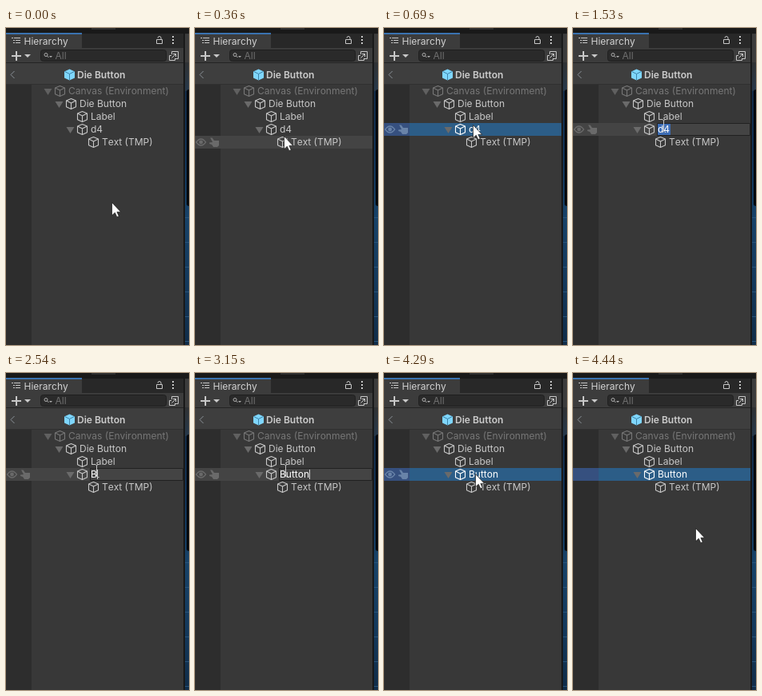
Recreate the animation shown at these times as an HTML page with a canvas. Size 229x397 px, loop 4470 ms.

```html
<!DOCTYPE html>
<html>
<head>
<meta charset="utf-8">
<title>Hierarchy rename</title>
<style>
html, body { margin: 0; width: 100%; height: 100%; overflow: hidden; background: #383838; }
canvas { display: block; }
</style>
</head>
<body>
<canvas id="stage" width="229" height="397"></canvas>
<script>
const g = document.getElementById('stage').getContext('2d', { alpha: false });
const LOOP = 4470, LIGHT = '#c8c8c8', RIGHT = 222, ROW = 16, TOP = 71;
const NAME_ROW = 3, TEXT_ROW = 4;

// Cursor keys: time, x, y
const keys = [
  [0, 132, 218], [360, 111, 135], [400, 111, 135], [520, 111, 121],
  [580, 111, 121], [620, 111, 117], [650, 111, 118], [690, 111, 121],
  [4260, 111, 121], [4440, 153, 194], [LOOP, 153, 194]
];
const typing = [[2540, 'B'], [2640, 'Bu'], [2810, 'But'], [2920, 'Butt'], [3040, 'Butto'], [3150, 'Button']];

function rect(x, y, w, h, color) {
  g.fillStyle = color;
  g.fillRect(x, y, w, h);
}

function text(s, x, y, color = LIGHT, weight = 400) {
  g.font = weight + ' 12px Inter, sans-serif';
  g.fontKerning = 'none';
  g.fillStyle = color;
  g.fillText(s, x, y);
}

function fill(d, color, x = 0, y = 0) {
  g.save();
  g.translate(x, y);
  g.fillStyle = color;
  g.fill(new Path2D(d));
  g.restore();
}

function line(d, color, x = 0, y = 0, width = 1) {
  g.save();
  g.translate(x, y);
  g.strokeStyle = color;
  g.lineWidth = width;
  g.lineJoin = 'round';
  g.stroke(new Path2D(d));
  g.restore();
}

function cube(x, y, color) {
  line('M0-6.5L6-4V3.7L0 6.5L-6 3.7V-4ZM-6-4L0-1L6-4M0-1V6.5', color, x, y, 1.1);
}

function gradient(x, y, w, h, ...colors) {
  const paint = g.createLinearGradient(0, y, 0, y + h);
  colors.forEach((c, i) => paint.addColorStop(i / (colors.length - 1), c));
  rect(x, y, w, h, paint);
}

function header() {
  rect(0, 0, 229, 7, '#191919');
  rect(107, 0, 30, 2, '#303030');
  rect(0, 7, RIGHT, 18, '#282828');
  rect(0, 7, 95, 18, '#3c3c3c');
  rect(0, 6, 95, 2, '#3a72b0');
  line('M10 12.5H18M12 15.5H18M12 18.5H18', LIGHT);
  fill('M7 12h2v1h-2zM9 15h2v1h-2zM9 18h2v1h-2z', LIGHT);
  text('Hierarchy', 22.5, 21, '#d2d2d2');

  line('M188.5 14.5H195.5V19.5H188.5ZM194 14.5V12.5A2 2 0 0 0 190 12.5', LIGHT);
  for (const y of [11, 15, 19]) rect(208, y - 1, 2, 2, LIGHT);

  rect(0, 25, RIGHT, 18, '#3c3c3c');
  rect(7, 34, 12, 2, LIGHT);
  rect(12, 29, 2, 12, LIGHT);
  fill('M23 33H31L27 37Z', LIGHT);
  g.beginPath();
  g.roundRect(43.5, 27.5, 157, 14, 3);
  g.fillStyle = '#2a2a2a';
  g.fill();
  g.strokeStyle = '#1f1f1f';
  g.lineWidth = 1;
  g.stroke();
  line('M52 33.5A2 2 0 1 1 48 33.5A2 2 0 1 1 52 33.5M51.5 35L53.5 37', '#b0b0b0');
  fill('M54 35H58L56 37Z', '#b0b0b0');
  text('All', 61.5, 39, '#707070');
  line('M207.5 33V29.5H215.5V38.5H212M207 34.5H204.5V40.5H211.5V38M207.5 37.5L212.5 32.5M209 32.5H212.5V36', LIGHT);

  rect(0, 43, RIGHT, 1, '#232323');
  rect(0, 44, RIGHT, 26, '#3e3e3e');
  rect(0, 70, RIGHT, 1, '#303030');
  line('M10.5 54L6 58.5L10.5 63', '#8b9299');
  fill('M0-7L6.5-4V4L0 7L-6.5 4V-4Z', '#7fd6fd', 79.5, 58.5);
  line('M-6-4L0-1L6-4M0-1V6.5', '#3c84a8', 79.5, 58.5);
  text('Die Button', 89, 63, '#cccccc', 600);
}

function rightEdge() {
  rect(222, 7, 2, 390, '#191919');
  rect(224, 8, 5, 35, '#3c3c3c');
  gradient(224, 43, 5, 36, '#303234', '#26384a');
  gradient(224, 79, 5, 318, '#142c48', '#123458', '#174268', '#14395c', '#102c48');
  for (let y = 237; y < 397; y += 31) rect(224, y, 5, 1, '#28537a');
  g.beginPath();
  g.roundRect(226, 77, 12, 146, 3);
  g.fillStyle = '#05080c';
  g.fill();
}

function hoverIcons(y, color) {
  line('M1.5 0Q7.5-8 13.5 0Q7.5 8 1.5 0Z', color, 0, y, 1.3);
  g.beginPath();
  g.arc(7.5, y, 2.4, 0, 7);
  g.fillStyle = color;
  g.fill();
  fill('M19-5.5H21.5L24-2H30V4L28 6H23L21 3L18 2V.5L22 0Z', color, 0, y);
}

function treeRow(i, x, label, color, open, iconColor = color) {
  const y = TOP + ROW * i + 8;
  if (open) fill('M-5-3H5L0 5Z', i ? '#6a6a6a' : '#606060', x - 14.5, y);
  cube(x + .5, y, iconColor);
  text(label, x + 11, y + 4, color);
}

function arrow(x, y) {
  const d = 'M.5.5V16.8L4.3 13.3L6.8 18.7L9.3 17.7L6.9 12.4H11.7Z';
  fill(d, '#ffffff', x, y);
  line(d, '#161616', x, y, .7);
}

function beam(x, y) {
  line('M-2.5.5H-1L.5 2L2 .5H3.5M.5 2V15M-2.5 16.5H-1L.5 15L2 16.5H3.5', '#c9c9c9', x, y);
}

function pointer(t) {
  t = Math.floor(t / 10) * 10;
  if (t < 360 || t >= 4260) t = Math.floor(t / 30) * 30;
  const i = Math.max(1, keys.findIndex(k => k[0] > t));
  const [t0, x0, y0] = keys[i - 1], [t1, x1, y1] = keys[i];
  const p = (t - t0) / (t1 - t0), e = p * p * (3 - 2 * p);
  return [Math.round(x0 + (x1 - x0) * e), Math.round(y0 + (y1 - y0) * e)];
}

function draw(t) {
  const [px, py] = pointer(t);
  const editing = t >= 1530 && t < 3380;
  const selected = t >= 650 && !editing;
  const typed = typing.filter(k => t >= k[0]).pop();
  const name = typed ? typed[1] : 'd4';
  const hover = Math.floor((py - TOP) / ROW);
  const y = TOP + ROW * NAME_ROW;

  rect(0, 0, 229, 397, '#383838');
  rect(0, TOP, 32, 326, '#2d2d2d');
  header();
  rightEdge();

  if (hover <= TEXT_ROW) rect(0, TOP + ROW * hover, RIGHT, ROW, '#444444');
  if (selected) {
    rect(0, y, RIGHT, ROW, '#2c5d87');
    rect(0, y, 32, ROW, '#36507f');
  }
  if (hover <= TEXT_ROW) {
    hoverIcons(TOP + ROW * hover + 8, selected && hover === NAME_ROW ? '#6983a8' : '#6a6a6a');
  }

  if (editing) {
    line(`M105.5 ${y + .5}H${RIGHT - .5}V${y + ROW - .5}H105.5Z`, '#212121');
    if (!typed) rect(106, y + 1, 16, ROW - 2, '#3d6db5');
  }

  treeRow(0, 67, 'Canvas (Environment)', '#777777', true);
  treeRow(1, 81, 'Die Button', LIGHT, true);
  treeRow(2, 95, 'Label', LIGHT);
  treeRow(NAME_ROW, 95, name, selected || editing ? '#ffffff' : LIGHT, true, selected ? '#ffffff' : LIGHT);
  treeRow(TEXT_ROW, 109, 'Text (TMP)', LIGHT);
  if (editing && typed) rect(106 + Math.round(g.measureText(name).width), y + 2, 1, 12, '#d0d0d0');

  if (editing) beam(113, 114);
  else if (t >= 3380 && t < 3450) beam(113, 111);
  else arrow(px, py);
}

function frame(now) {
  draw(now % LOOP);
  requestAnimationFrame(frame);
}
draw(0);
requestAnimationFrame(frame);
</script>
</body>
</html>
```
